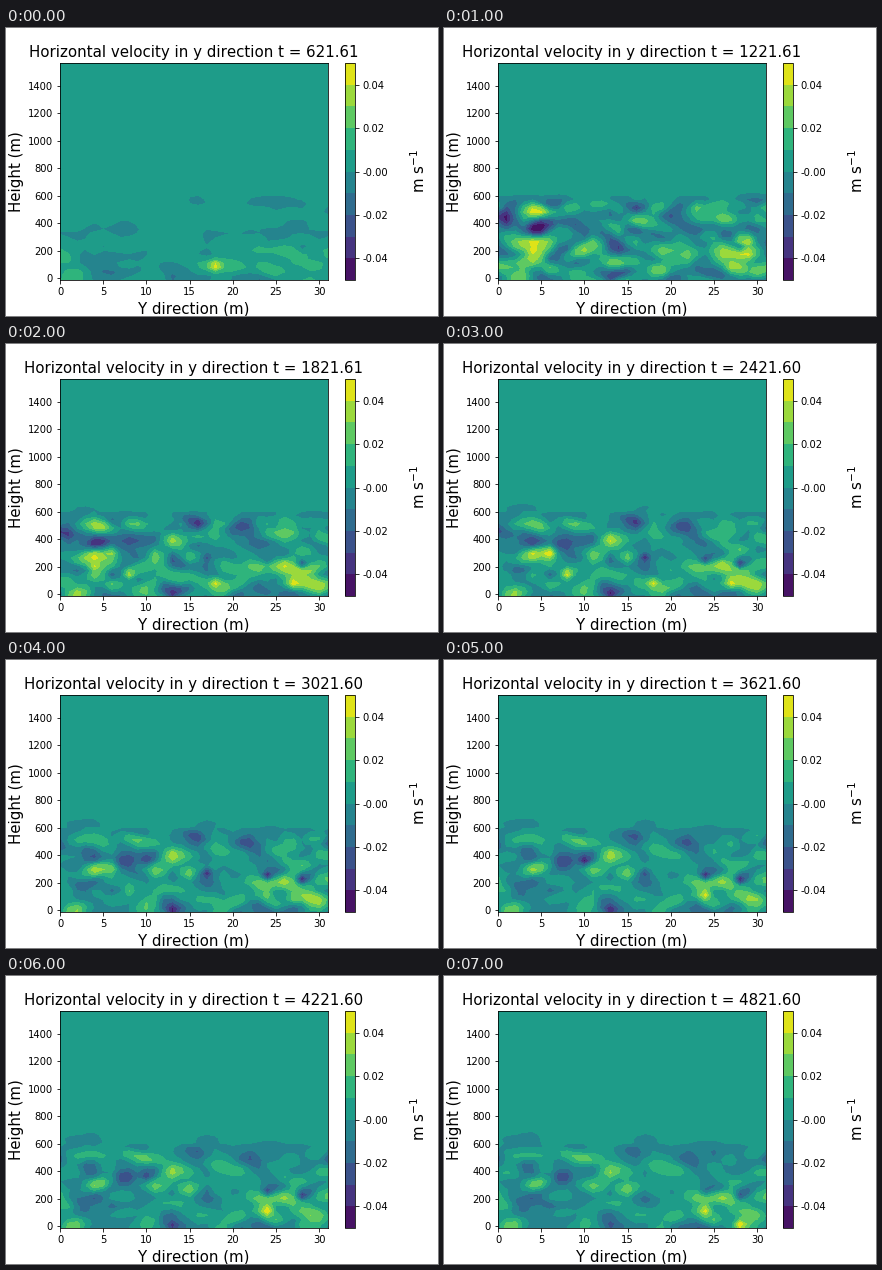
Animation, 432 px wide and 288 px high, one loop 8 s. Source, as a matplotlib script:

```python
import numpy as np
import matplotlib.pyplot as plt
from matplotlib.animation import FuncAnimation

plt.rcParams["text.kerning_factor"] = 6

STEPS = 8
LEVELS = np.linspace(-0.05, 0.05, 11)
X = np.arange(32.0)
Z = -15.5 + 31.0 * np.arange(52)
GX, GZ = np.meshgrid(X, Z)
REST = 2e-4  # still air above the mixed layer

# Strongest eddies: x, z, peak velocity, step of the peak, lifetime in steps
EDDIES = [
    (18, 90, 0.047, 0, 0.5), (28.5, 262, 0.055, 1, 0.8), (4, 205, 0.05, 1.5, 1.2),
    (6, 295, 0.056, 3, 1.3), (8, 150, 0.046, 2.7, 1.5), (18, 80, 0.05, 2.5, 1.3),
    (27, 80, 0.048, 2.5, 1.5), (24, 115, 0.053, 6, 2.2), (28, 10, 0.055, 7, 1),
    (13, 0, -0.05, 4, 4), (17, 270, -0.046, 3.5, 2.5), (24, 255, -0.045, 4.5, 3),
    (28, 222, -0.046, 4.5, 4), (10, 360, -0.048, 5, 1.5),
]


def noise(seed, wide, tall):
    """Unit-variance turbulence, smoothed a number of times along x and z."""
    n = np.random.default_rng(seed).normal(size=GX.shape)
    for axis, passes in ((1, wide), (0, tall)):
        for _ in range(passes):
            n = n + 0.5 * (np.roll(n, 1, axis) + np.roll(n, -1, axis))
    return n / n.std()


def band(z, spread):
    return np.exp(-((GZ - z) / spread) ** 2)


FINE_A, FINE_B = noise(4, 1, 2), noise(11, 1, 2)
BROAD = noise(23, 3, 2)
MIXED = np.clip((605 - GZ) / 45, 0, 1)
GROUND = np.clip((260 - GZ) / 150, 0, 1)


def calm():
    mean = 0.004 - 0.0045 * band(335, 70) - 0.003 * band(555, 40)
    swirl = (0.003 + 0.005 * GROUND) * (0.8 * BROAD + 0.5 * FINE_B)
    return REST + MIXED * (mean + swirl)


def turbulent(k):
    age = (k - 1) / 6
    turn = 1.6 * (1 - np.exp(-3 * age))
    swirl = np.cos(turn) * FINE_A + np.sin(turn) * FINE_B
    swirl = (1 - 0.3 * age) * swirl + 0.45 * age * BROAD
    lid = band(570, 35)
    size = (0.0165 - 0.002 * age) * (1 - 0.5 * lid)
    wisps = 0.0012 * age * BROAD * np.exp(-np.abs(GZ - 620) / 30)
    return REST + wisps + MIXED * (0.002 - 0.006 * lid + size * swirl)


def field(k):
    v = turbulent(k) if k else calm()
    for x, z, peak, when, life in EDDIES:
        near = np.exp(-0.5 * (((GX - x) / 0.6) ** 2 + ((GZ - z) / 28) ** 2))
        near *= np.exp(-((k - when) / life) ** 2)
        v = v * (1 - near) + peak * near
    v = np.where(GZ > 720, REST, v)
    return np.clip(v, -0.0499, 0.0499)


fig, ax = plt.subplots(figsize=(6, 4), dpi=72)
fig.subplots_adjust(left=0.125, right=0.9, bottom=0.1242, top=0.8792)


def draw_field(k):
    return ax.contourf(X, Z, field(k), levels=LEVELS, cmap="viridis")


shown = [draw_field(0)]
bar = fig.colorbar(shown[0], ax=ax)
bar.set_ticks([-0.04, -0.02, 0, 0.02, 0.04],
              labels=["-0.04", "-0.02", "-0.00", "0.02", "0.04"])
bar.set_label("m s$^{-1}$", fontsize=15, labelpad=21)

ax.set_xlim(0, 31)
ax.set_ylim(Z[0], Z[-1])
ax.set_xticks(range(0, 31, 5))
ax.set_yticks(range(0, 1401, 200))
ax.set_xlabel("Y direction (m)", fontsize=15)
ax.set_ylabel("Height (m)", fontsize=15)
title = ax.set_title("", fontsize=15)


def update(k):
    shown[0].remove()
    shown[0] = draw_field(k)
    seconds = 621.61 + 600 * k - (0.01 if k > 2 else 0)
    title.set_text(f"Horizontal velocity in y direction t = {seconds:.2f}")
    return shown[0], title


anim = FuncAnimation(fig, update, frames=STEPS, interval=1000,
                     repeat=True, repeat_delay=0, blit=False)
plt.show()
```
